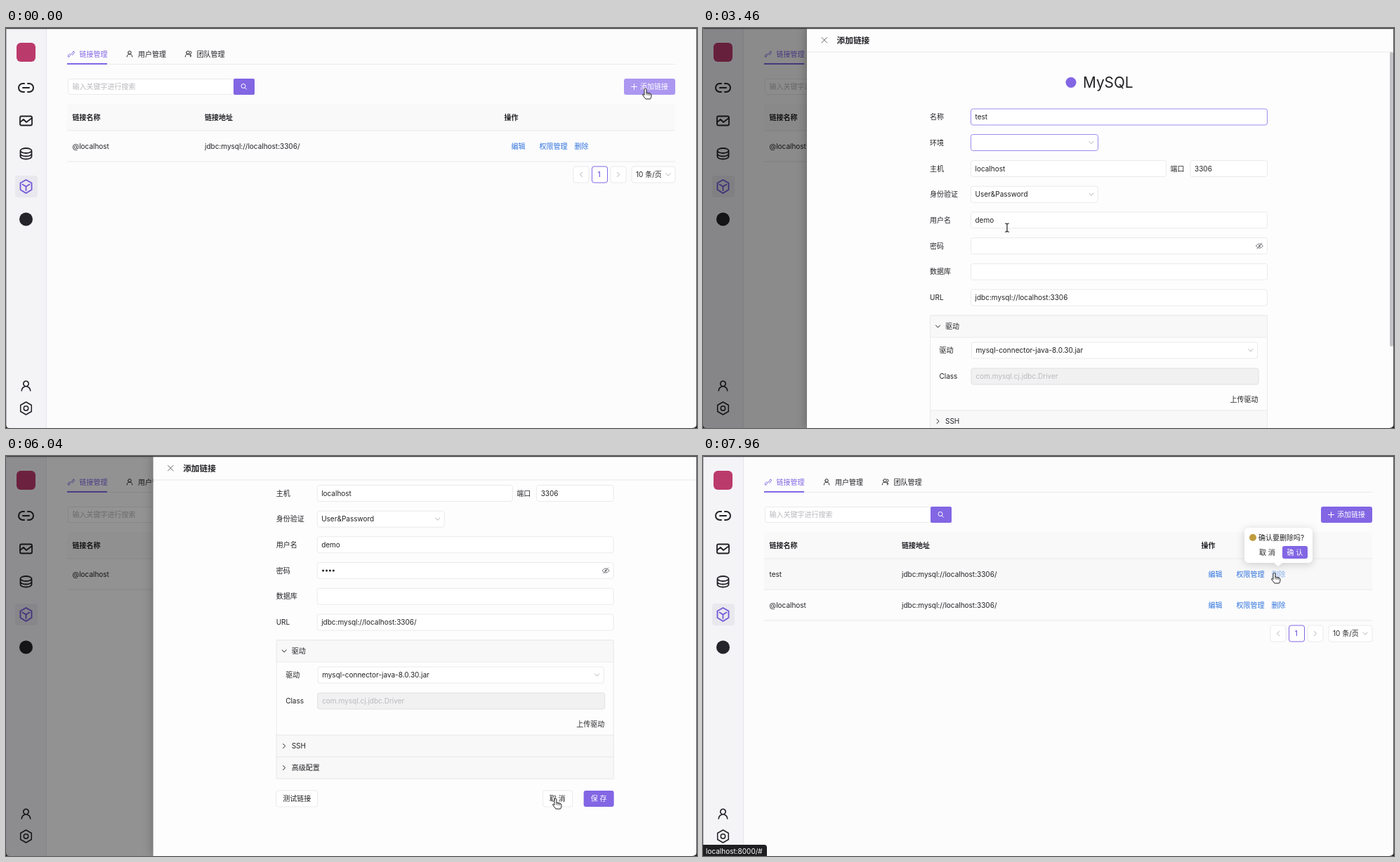
Animation of 984 by 569 pixels, one loop 8000 ms. Source, as an HTML page:

```html
<!DOCTYPE html>
<html lang="zh-CN">
<head>
<meta charset="utf-8">
<title>链接管理</title>
<style>
  html, body { margin: 0; width: 100%; height: 100%; overflow: hidden; background: #fcfcfd; }
  svg { display: block; width: 984px; height: 569px; font: 10px Inter, "Noto Sans CJK SC", sans-serif; }
  text { white-space: pre; }
  .float { filter: drop-shadow(0 2px 6px rgba(0, 0, 0, .18)); }
</style>
</head>
<body>
<svg id="stage" viewBox="0 0 984 569"></svg>
<script>
const LOOP = 8000, DRAWER_X = 148, DRAWER_MS = 300;
const PURPLE = '#8266e4', INK = '#222226', BLUE = '#2f72dc', BORDER = '#eaeaec', FAINT = '#b9b9be';
const stage = document.getElementById('stage');
const clamp = v => Math.max(0, Math.min(1, v));
const progress = (t, start, length) => clamp((t - start) / length);
const smooth = p => p * p * (3 - 2 * p);

// cubic-bezier(.7, .3, .1, 1)
function ease(x) {
  const curve = (s, a, b) => 3 * (1 - s) ** 2 * s * a + 3 * (1 - s) * s * s * b + s ** 3;
  let lo = 0, hi = 1;
  for (let i = 0; i < 20; i++) {
    const mid = (lo + hi) / 2;
    if (curve(mid, .7, .1) < x) lo = mid; else hi = mid;
  }
  return curve(lo, .3, 1);
}

// Drawing helpers; text is placed by its vertical centre.
const text = (x, y, s, fill = INK, size = 10, weight = 400) =>
  `<text x="${x}" y="${y + size * .36}" fill="${fill}" font-size="${size}" font-weight="${weight}">${s.replace(/&/g, '&amp;')}</text>`;
const rect = (x, y, w, h, fill, stroke = 'none', r = 0, extra = '') =>
  `<rect x="${x}" y="${y}" width="${w}" height="${h}" rx="${r}" fill="${fill}" stroke="${stroke}" ${extra}/>`;
const line = (d, stroke = BORDER, width = 1, extra = '') =>
  `<path d="${d}" fill="none" stroke="${stroke}" stroke-width="${width}" stroke-linecap="round" stroke-linejoin="round" ${extra}/>`;
const circle = (x, y, r, fill, extra = '') => `<circle cx="${x}" cy="${y}" r="${r}" fill="${fill}" ${extra}/>`;
const group = (x, y, body, extra = '') => `<g transform="translate(${x} ${y})" ${extra}>${body}</g>`;
const rule = (x1, x2, y) => rect(x1, y, x2 - x1, 1, BORDER);
const chevron = (x, y, angle = 0, color = '#b4b4b8') =>
  line('M-3 -1.6L0 1.6L3 -1.6', color, 1, `transform="translate(${x} ${y}) rotate(${angle})"`);
const person = (x, y, scale) =>
  line('M-3 -2a3 3 0 1 0 6 0a3 3 0 1 0 -6 0M-5 6a5 5 0 0 1 10 0', INK, 1.3, `transform="translate(${x} ${y}) scale(${scale})"`);

function sidebar() {
  const gear = Array.from({ length: 6 }, (_, i) => {
    const a = i * Math.PI / 3 - Math.PI / 2;
    return `${i ? 'L' : 'M'}${28.5 + 9 * Math.cos(a)} ${541 + 9 * Math.sin(a)}`;
  }).join('') + 'Z';
  return rect(0, 0, 57, 569, '#f4f4f7') + rect(57, 0, 1, 569, '#e6e6ea')
    + rect(15, 21, 27, 27, '#bb3a6c', 'none', 6)
    + line('M26 79H24a6 6 0 0 0 0 12H26M31 79H33a6 6 0 0 1 0 12H31M24 85H33', INK, 2)
    + rect(20, 125.5, 17, 13, 'none', INK, 2, 'stroke-width="1.8"') + line('M20 134L25 130L29 134L37 128', INK, 1.8)
    + line('M20.5 174.5a8 3.5 0 1 0 16 0a8 3.5 0 1 0 -16 0V183a8 3.5 0 0 0 16 0V174.5M20.5 179a8 3.5 0 0 0 16 0', INK, 1.8)
    + rect(13, 210, 32, 31, '#e9e8ee', 'none', 4)
    + line('M28.5 216L36.5 220.5V230L28.5 235L20.5 230V220.5ZM23.5 222.5L28.5 225.5L33.5 222.5M28.5 225.5V231', '#7257d9', 1.8)
    + circle(28.5, 272, 9.5, '#24242a')
    + person(28.5, 508.5, 1.25)
    + line(gear, INK, 1.5) + circle(28.5, 541, 3.2, 'none', `stroke="${INK}" stroke-width="1.5"`);
}

function pager(y) {
  return rect(808, y - 11.5, 22, 23, '#fff', BORDER, 3) + chevron(819, y, -270)
    + rect(834.5, y - 11.5, 22, 23, '#fff', PURPLE, 3) + text(842.5, y, '1', PURPLE, 10, 600)
    + rect(861, y - 11.5, 22, 23, '#fff', BORDER, 3) + chevron(872, y, -90)
    + rect(891, y - 11.5, 62, 23, '#fff', BORDER, 3) + text(897, y, '10 条/页') + chevron(943, y);
}

function page(t) {
  const rows = t < 6300 ? ['@localhost'] : ['test', '@localhost'];
  const hovered = t > 7740;
  const body = rows.map((name, i) => {
    const y = 168 + i * 44, active = hovered && i === 0;
    return (active ? rect(87, y - 21, 866, 43, '#f8f8f9') : '')
      + text(94.5, y, name) + text(283, y, 'jdbc:mysql://localhost:3306/')
      + text(719.5, y, '编辑', BLUE, 10, 500) + text(759.5, y, '权限管理', BLUE, 10, 500)
      + text(809.5, y, '删除', active ? '#86b0ec' : BLUE, 10, 500) + rule(87, 953, y + 21.5);
  }).join('');
  return rect(0, 0, 984, 569, '#fcfcfd') + sidebar()
    + line('M91 40l-2 1.5a2 2 0 0 1-.5-2.5l2.5-2.5M95 34l1.5-1a2 2 0 0 1 .5 2.5l-2.5 3M91 39l4-4', PURPLE, 1)
    + text(104.5, 37, '链接管理', PURPLE)
    + person(176, 36.5, .75) + text(188, 37, '用户管理')
    + person(259, 36.5, .75) + line('M262 33a2 2 0 0 1 0 4l2 3', INK, .9) + text(271.5, 37, '团队管理')
    + rule(87, 953, 51) + rect(87, 50, 57, 2, PURPLE)
    + rect(88.5, 72.5, 236, 22, '#fff', BORDER, 3) + text(94.5, 83.5, '输入关键字进行搜索', FAINT)
    + rect(324, 72, 30, 23, PURPLE, 'none', 2)
    + circle(338, 82.5, 3, 'none', 'stroke="#fff"') + line('M340.3 85L342.5 87.2', '#fff')
    + rect(880, 72, 73, 23, t < 200 ? '#ac97f1' : PURPLE, 'none', 3)
    + line('M890.5 83.5H898.5M894.5 79.5V87.5', '#fff') + text(903, 83.5, '添加链接', '#fff')
    + rect(87, 108, 866, 38, '#f9f9fa') + rule(87, 953, 145.5)
    + text(94.5, 127, '链接名称', INK, 10, 600) + text(283, 127, '链接地址', INK, 10, 600) + text(709.5, 127, '操作', INK, 10, 600)
    + body + pager(164.5 + rows.length * 44);
}

function field(y, label, value, { x = 381, right = 804, focus, select, labelX = 323 } = {}) {
  return text(labelX, y, label)
    + rect(x + .5, y - 11.5, right - x - 1, 23, '#fff', focus ? '#9f8bea' : BORDER, 3)
    + text(x + 6.5, y, value) + (select ? chevron(right - 10, y) : '');
}

function form(t) {
  const typed = (word, start, step) => word.slice(0, Math.max(0, Math.floor((t - start) / step) + 1));
  const name = t < 1900 ? '@localhost' : typed('test', 2000, 150);
  const panel = (y, label, open) => rect(323.5, y, 480, 31, '#f8f8f9', BORDER)
    + chevron(334.5, y + 15.5, open ? 0 : -90, INK) + text(345, y + 15.5, label);
  const passwordFocus = t > 3700 && t < 5000 || t > 7000;
  return circle(524, 77.5, 7.5, PURPLE) + text(541, 77.5, 'MySQL', INK, 20.8)
    + field(126.5, '名称', name, { focus: t > 1500 && t < 3700 })
    + field(163, '环境', '', { right: 563, select: true, focus: true })
    + field(200, '主机', 'localhost', { right: 660 })
    + field(200, '端口', '3306', { x: 693.5, labelX: 665.5 })
    + field(236.7, '身份验证', 'User&Password', { right: 563, select: true })
    + field(273.3, '用户名', 'demo')
    + field(310, '密码', '', { focus: passwordFocus })
    + [...typed('••••', 3850, 130)].map((_, i) => circle(390 + i * 4.9, 310, 1.5, INK)).join('')
    + line('M787.5 310q5-6.5 10 0q-5 6.5-10 0M789 314L796 306', '#77777c', 1) + circle(792.5, 310, 1.5, '#77777c')
    + field(346.7, '数据库', '')
    + field(383.5, 'URL', 'jdbc:mysql://localhost:3306' + (t < 4400 ? '' : '/'))
    + rect(323.5, 409, 480, 197, '#fdfdfd', BORDER, 4)
    + panel(409, '驱动', true)
    + field(458.5, '驱动', 'mysql-connector-java-8.0.30.jar', { x: 382, right: 790, labelX: 336.5, select: true })
    + text(336.5, 495.5, 'Class') + rect(382, 484, 409, 23, '#f1f1f2', '#e0e0e2', 3)
    + text(388.5, 495.5, 'com.mysql.cj.jdbc.Driver', FAINT)
    + text(750.5, 528.5, '上传驱动')
    + panel(544, 'SSH') + panel(575, '高级配置')
    + rect(323, 623, 59, 23, '#fff', BORDER, 3) + text(332.5, 634.5, '测试链接')
    + rect(703, 623, 42, 23, '#fff', BORDER, 3) + text(712, 634.5, '取 消')
    + rect(761, 623, 43, 23, PURPLE, 'none', 3) + text(771, 634.5, '保 存', '#fff');
}

function spinner(t) {
  const turn = 22 + (t - 6960) / 800 * 360;
  return [0, 90, 180, 270].map(a => circle(564, 268, 2.4, '#cbc3f3',
    `transform="rotate(${turn + a} 564 268) translate(0 -5.3)"`)).join('')
    + rect(556, 552, 14, 5, '#d2d2d6');
}

function drawer(t) {
  const phase = (open, close) => ease(progress(t, open, DRAWER_MS)) - ease(progress(t, close, DRAWER_MS));
  const editing = t > 6500;
  const shown = editing ? phase(6836, 7376) : phase(120, 6000);
  if (shown <= 0) return '';
  const scroll = 147 * smooth(progress(t, 4750, 300));
  const loaded = editing ? t > 7170 : t > 850;
  const content = loaded
    ? group(0, -scroll, form(t)) + rect(978, 34 + scroll * 117 / 147, 5, 419, '#c3c3c6', 'none', 2)
    : (editing || t < 450) ? spinner(t) : '';
  return rect(0, 0, 984, 569, '#000', 'none', 0, `opacity="${.45 * shown ** .85}"`)
    + group((1 - shown) * 836, 0,
      rect(DRAWER_X, 0, 836, 569, '#fdfdfe', 'none', 0, 'style="filter:drop-shadow(-3px 0 6px rgba(0,0,0,.2))"')
      + `<g clip-path="url(#below-header)">${content}</g>`
      + rule(DRAWER_X, 984, 33.5) + line('M169 13.5L176.5 21M176.5 13.5L169 21', '#66666a', 1)
      + text(190.5, 17.5, editing ? '编辑链接' : '添加链接', INK, 11.7, 600));
}

function toast(t) {
  const enter = smooth(progress(t, 6280, 120)), leave = progress(t, 7440, 130);
  const alpha = enter * (1 - leave);
  if (!alpha) return '';
  return group(0, -9 * leave - 12 * (1 - enter),
    rect(448, 15, 87, 33, '#fff', 'none', 6, 'class="float"') + circle(465, 32, 6.7, '#52b426')
    + line('M462.3 32.2L464.3 34L467.8 30', '#fff', 1.1) + text(478, 32, '创建成功', INK, 11.7),
    `opacity="${alpha}"`);
}

function confirmBox(t) {
  const alpha = progress(t, 7850, 90);
  return alpha ? `<g opacity="${alpha}"><g class="float">${rect(771, 102, 97, 50, '#fff', 'none', 6)}
    <path d="M813 152L819 157L825 152Z" fill="#fff"/></g>`
    + circle(783, 116, 5, '#c09c3f') + text(791, 116, '确认要删除吗?')
    + text(792, 137, '取 消') + rect(825, 128, 36, 18, PURPLE, 'none', 3) + text(831.5, 137, '确 认', '#fff') + '</g>' : '';
}

const statusBar = t => t > 7740 || t > 6720 && t < 6890
  ? rect(-4, 553, 95, 20, '#1f1f22', 'none', 4) + text(4, 562, 'localhost:8000/#', '#fff') : '';

// Pointer path: time, x, y, shape from that time on.
const PATH = [
  [0, 911, 87, 'hand'], [200, 911, 87, 'arrow'], [700, 380, 131, 'arrow'], [850, 400, 131, 'beam'],
  [1210, 441, 133, 'beam'], [1500, 441, 130, 'beam'], [2900, 441, 130, 'beam'], [3460, 433, 284, 'beam'],
  [3680, 430, 310, 'beam'], [4500, 430, 310, 'beam'], [4720, 560, 320, 'arrow'], [5050, 560, 320, 'arrow'],
  [5480, 788, 532, 'arrow'], [5680, 788, 532, 'arrow'], [5880, 783, 488, 'hand'], [6080, 783, 488, 'arrow'],
  [6720, 731, 170, 'hand'], [6900, 731, 170, 'arrow'], [7250, 731, 170, 'arrow'], [7480, 646, 163, 'arrow'],
  [7530, 646, 163, 'arrow'], [7740, 814, 167, 'hand'], [LOOP, 814, 167, 'hand']
];
const SHAPES = {
  arrow: '<path d="M0 0V12L2.8 9.4L4.6 13.6L6.6 12.7L4.8 8.7H8.5Z" fill="#111" stroke="#fff" stroke-width=".8"/>',
  beam: line('M-2.5 -6Q0 -6 0 -4.5Q0 -6 2.5 -6M0 -4.5V4.5M-2.5 6Q0 6 0 4.5Q0 6 2.5 6', '#222', 1.2),
  hand: '<path d="M-2 1Q-2-1-.5-1T1 1V5L6 6Q8 6.5 8 9Q8 12 6.5 14H0L-4 9Q-5 7-3.5 7L-2 8.5Z" fill="#fff" stroke="#222"/>'
    + line('M1 5V8M3.3 6V8.5M5.6 6.3V8.8', '#222', .8)
};

function pointer(t) {
  const i = PATH.findIndex(k => k[0] > t) - 1;
  const [start, x, y, shape] = PATH[i], [end, nextX, nextY] = PATH[i + 1];
  const p = smooth(progress(t, start, end - start));
  return group(x + (nextX - x) * p, y + (nextY - y) * p, SHAPES[shape]);
}

const DEFS = `<clipPath id="below-header">${rect(DRAWER_X, 34, 836, 535, '#000')}</clipPath>`;
const FRAME = rect(0, 0, 984, 1.3, '#3c3c40') + rect(983, 0, 1, 569, '#55555a') + rect(0, 0, .6, 569, '#88888c')
  + '<path d="M984 562V569H977Q984 569 984 562ZM0 564V569H5Q0 569 0 564Z" fill="#222"/>';

function render() {
  const t = performance.now() % LOOP;
  stage.innerHTML = DEFS + page(t) + drawer(t) + toast(t) + confirmBox(t) + FRAME + statusBar(t) + pointer(t);
  requestAnimationFrame(render);
}
render();
</script>
</body>
</html>
```
